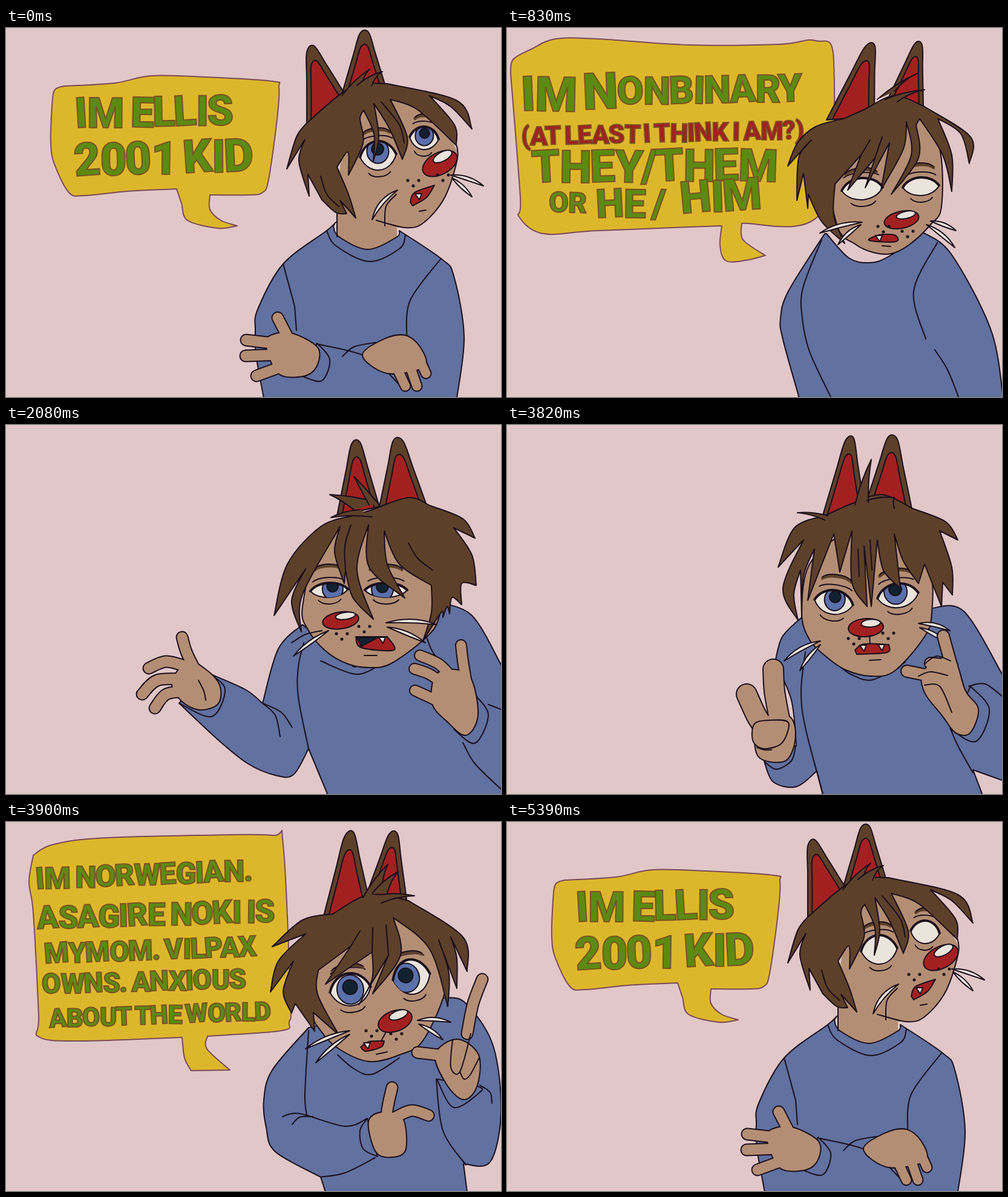
Recreate the animation shown at these times as an HTML page. Size 818 px wide and 610 px high, loop 5.47 s.

```html
<!DOCTYPE html>
<html lang="en">
<head>
<meta charset="utf-8">
<title>About me</title>
<style>
html, body { margin: 0; width: 100%; height: 100%; overflow: hidden; background: #e2c7c9; }
svg { display: block; width: 818px; height: 610px; }
path, ellipse { stroke: #1a0e1c; stroke-width: 2; stroke-linejoin: round; stroke-linecap: round; }
text { font: 900 50px Roboto, "Liberation Sans", sans-serif; letter-spacing: -.03em; word-spacing: -.05em; fill: #5c8a12; stroke: #7c5020; stroke-width: 2; }
text.red { fill: #a02022; }
</style>
</head>
<body>
<svg id="stage" viewBox="0 0 818 610"></svg>
<script>
const ink = '#1a0e1c', gold = '#ddb72b', blue = '#6171a0', skin = '#b48e74', brown = '#5d402a',
  red = '#a32021', white = '#ebe4dc', iris = '#5a70ab', dark = '#10222f';

// Smooth curve through points, with a sharp corner at each "/".
function curve(text, closed) {
  const loop = closed && !text.includes('/');
  let d = '', end;
  for (const piece of text.split('/')) {
    if (!piece.trim()) continue;
    const n = piece.trim().split(' ').map(Number), pts = end ? [end] : [];
    for (let i = 0; i < n.length; i += 2) pts.push([n[i], n[i + 1]]);
    if (!end) d = 'M' + pts[0];
    if (loop) pts.push(pts[0]);
    for (let i = 1; i < pts.length; i++) {
      const b = pts[i - 1], p = pts[i];
      const a = pts[i - 2] || (loop ? pts.at(-2) : b);
      const q = pts[i + 1] || (loop ? pts[1] : p);
      d += `C${b.map((v, k) => v + (p[k] - a[k]) / 6)} ${p.map((v, k) => v - (q[k] - b[k]) / 6)} ${p}`;
    }
    end = pts.at(-1);
  }
  return d + (closed ? 'Z' : '');
}

const path = (d, fill = 'none', edge = ink, width = 2) => `<path d="${d}" fill="${fill}" style="stroke:${edge};stroke-width:${width}"/>`;
const shape = (fill, text, edge) => path(curve(text, true), fill, edge);
const line = text => path(curve(text));
const oval = (x, y, rx, ry, fill) => `<ellipse cx="${x}" cy="${y}" rx="${rx}" ry="${ry}" fill="${fill}"/>`;
const at = (x, y, turn, inner) => `<g transform="translate(${x} ${y}) rotate(${turn})">${inner}</g>`;

const sweater = text => shape(blue, text);
const face = text => shape(skin, text);
const hair = text => shape(brown, text);
const balloon = text => shape(gold, text, '#7a4a58');

function say(x, y, size, turn, text, tone = '') {
  const tilt = [...text].map((_, i) => (i * 3 % 5 - 2) * 1.2).join(' ');
  return `<text class="${tone}" x="${x}" y="${y}" rotate="${tilt}" transform="rotate(${turn} ${x} ${y})" style="font-size:${size}px">${text}</text>`;
}

// Base corners a and b, tip t; the inside is the same outline, smaller.
function ear(ax, ay, bx, by, tx, ty) {
  const cx = (ax + bx) / 2, cy = (ay + by) / 2, wx = bx - ax, wy = by - ay;
  const side = (x, y, s) => [x + (tx - x) * .6 + wx * s, y + (ty - y) * .6 + wy * s];
  const pts = [[ax, ay], side(ax, ay, -.06), [tx - wx * .1, ty - wy * .1 + 2], [tx + wx * .1, ty + wy * .1 + 2], side(bx, by, .06), [bx, by]];
  const part = k => pts.map(([x, y]) => `${cx + (x - cx) * k} ${cy + (y - cy) * k}`).join(' ') + '/';
  return shape(brown, part(1)) + shape(red, part(.76));
}

let eyes = 0;
function eye(x, y, rx, ry, turn, dx, dy, r, gap) {
  const arc = (h, w = rx, lift = 0) => `M${-w} ${-lift}C${-w * .6} ${-h * 1.33 - lift} ${w * .6} ${-h * 1.33 - lift} ${w} ${-lift}`;
  const ball = arc(ry) + `C${rx * .6} ${ry * 1.33} ${-rx * .6} ${ry * 1.33} ${-rx} 0Z`;
  const id = 'eye' + eyes++;
  return at(x, y, turn, `<clipPath id="${id}"><path d="${ball}"/></clipPath>` + path(ball, white) +
    `<g clip-path="url(#${id})">${oval(dx, dy, r, r * 1.1, iris)}${oval(dx, dy - 4, r * .55, r * .55, dark)}</g>` +
    path(arc(ry), 'none', ink, 4) + path(arc(6, rx * .85, ry + 3)) + path(arc(-7, rx * .6, -ry - 4)) +
    path(arc(6, rx * .75, ry + gap - 4), 'none', brown, 5) + path(arc(7, rx * .75, ry + gap - 2)));
}

const nose = (x, y, rx, ry, turn) => at(x, y, turn, oval(0, 0, rx, ry, red) + oval(rx * .3, -ry * .45, rx * .55, ry * .42, white));
const fang = (x, y) => path(`M${x} ${y}l11 0l-4 10z`, white);
const freckles = (x, y) => [-9, 0, 9].map((d, i) => oval(x + d, y - 4 + i % 2 * 9, 1.5, 1.5, dark)).join('');

function whisker(x, y, tx, ty, bend) {
  const dx = tx - x, dy = ty - y, len = Math.hypot(dx, dy);
  const mid = b => `${(x + tx) / 2 + dy / len * b} ${(y + ty) / 2 - dx / len * b}`;
  return path(`M${x} ${y}Q${mid(bend + 6)} ${tx} ${ty}Q${mid(bend - 6)} ${x} ${y}Z`, white);
}

// Loose lock from a to the tip and back to b, open at the root.
const lock = (ax, ay, bx, by, tx, ty) =>
  path(`M${ax} ${ay}Q${(ax + tx) / 2 - 3} ${(ay + ty) / 2 - 5} ${tx} ${ty}Q${(bx + tx) / 2 - 3} ${(by + ty) / 2 - 5} ${bx} ${by}`, brown);

// Fingers are thick strokes merged with the palm.
function hand(width, palm, ...fingers) {
  const p = curve(palm, true);
  const layer = (edge, extra) => fingers.map(f => path(curve(f), 'none', edge, width + extra)).join('');
  return path(p, skin, ink, 4) + layer(ink, 4) + path(p, skin, 'none') + layer(skin, 0);
}

const poses = {
  proud: {
    speech: balloon('96 96 180 91 240 79 330 81 440 88 451 98 448 150 434 250 424 272 400 276 337 276/337 300 355 318 382 327/350 331 300 318 290 290 282 266/200 270 130 277 104 272 80 225 74 190 76 130 80 103 96 96') +
      say(115, 165, 70, -1, 'IM ELLIS') + say(114, 245, 76, -1.6, '2001 KID'),
    body: shape(skin, '547 270 547 345/570 362 605 370 646 350/646 320/', 'none') +
      sweater('545 321 530 335 458 390 416 465 412 500 413 540 426 612/745 612/757 510 740 410 720 382 650 335/645 346 598 366 550 345 541 327/') +
      line('547 300 547 345') + line('530 335 545 360 600 386 650 365 660 343') +
      line('458 390 477 460/480 500') + line('718 382 668 450 662 510') +
      line('517 523 600 545 655 595') + line('556 543 575 527 610 520') +
      sweater('514 521 535 548 522 583 490 576/'),
    head: shape(skin, '575 140 640 120 700 130 735 185 745 215 725 280 690 322 660 330 625 325 550 300', 'none') +
      line('742 185 746 215 725 280 690 322 660 330 612 318') +
      ear(497, 160, 558, 106, 503, 33) + ear(556, 106, 627, 96, 592, 6) +
      eye(615, 211, 30, 24, -5, 0, -7, 18, 17) + eye(691, 182, 24, 19, 5, 0, -4, 15, 16) +
      hair('497 157 480 180 464 233/494 184/484 220 501 278/499 242/522 284/545 305 563 307/552 285/578 314/566 275 547 230/565 205 566 243/590 190 585 150 591 136/608 175 607 220/616 180 608 125/633 165 655 217/663 180 635 118/680 135 744 194/741 160 700 112/735 130 770 167/745 120 630 92/570 98 497 157') +
      lock(555, 112, 588, 95, 601, 68) + lock(580, 95, 604, 96, 622, 72) +
      line('620 122 650 160 658 190') + line('520 245 530 275 550 295') +
      nose(717, 224, 31, 18, -28) + shape(red, '668 288 675 272 708 260/695 280 672 294/') + fang(676, 274) + line('683 303 694 301') +
      freckles(673, 256) + freckles(722, 247) +
      whisker(647, 268, 605, 317, -12) + line('645 275 628 295 626 327') +
      whisker(735, 243, 789, 261, 6) + whisker(737, 248, 770, 279, 2),
    hands: hand(17, '450 505 480 508 515 530 512 560 490 575 450 570 430 520', '449 479 465 510', '397 516 450 522', '396 542 450 540', '414 575 455 560') +
      hand(15, '590 541 625 515 660 509 685 530 690 560 630 570', '660 592 645 560', '679 592 668 560', '694 571 680 540')
  },
  shy: {
    speech: balloon('6 75 10 52 40 35 80 18 150 18 300 28 450 27 510 21 540 55 520 303 388 323/390 350 427 376/395 384 362 385 352 360 355 327/150 335 60 340 20 312 22 280 6 75') +
      say(24, 137, 80, 0, 'IM') + say(126, 135, 84, 0, 'N') + say(183, 127, 64, -1, 'ONBINARY') +
      say(24, 194, 43, -1.3, '(AT LEAST I THINK I AM?)', 'red') + say(42, 256, 75, -.6, 'THEY/THEM') +
      say(70, 305, 47, 0, 'OR') + say(148, 314, 66, -.6, 'HE /') + say(288, 307, 74, -3, 'HIM'),
    body: sweater('525 340 465 435 452 480 456 515 483 612/820 612/800 500 735 375 688 338/632 377 600 388 565 380 528 340') +
      line('520 350 489 430 488 480 500 535 536 612') + line('711 355 672 435 692 514') + line('707 532 728 565 747 612'),
    head: face('530 200 545 325 575 357 605 371 635 373 665 358 700 325 718 295 715 200 680 140 600 140') +
      ear(528, 152, 607, 145, 600, 28) + ear(628, 120, 688, 132, 680, 25) +
      eye(587, 266, 34, 18, -5, 8, 6, 17, 12) + eye(684, 262, 30, 15, -3, 0, 5, 16, 19) +
      hair('556 150 510 163 480 190 464 228/503 185/482 215 479 285/490 240/497 298/498 275/520 320 558 356/540 310 542 258/585 210/563 268/608 215/592 264/632 190/618 268/655 200 660 155/668 210 635 275/680 215 676 160/682 150/720 210 735 270/735 210 712 150/750 175 764 224/766 180 690 130/640 112 590 135 556 150') +
      lock(612, 118, 640, 105, 678, 75) + lock(625, 118, 645, 122, 690, 102) +
      line('585 210 600 185') + line('608 215 620 180') +
      nose(652, 317, 29, 14, -12) + shape(red, '598 351 615 342 640 342 646 351 633 354') + fang(609, 343) + line('620 360 634 361') +
      freckles(622, 332) + freckles(662, 340) +
      whisker(587, 321, 517, 339, -7) + whisker(585, 325, 547, 358, -5) + whisker(693, 325, 740, 363, 6) + whisker(700, 319, 742, 335, 4),
    hands: ''
  },
  shrug: {
    speech: balloon('29 70 60 55 150 47 260 38 420 40 460 46 467 60 468 200 440 290 362 299/362 320 399 348/370 356 340 354 328 330 328 296/150 311 55 318 44 300 30 160 29 70') +
      say(50, 142, 72, -.8, 'IM ARTIST?') + say(62, 200, 55, -1.5, 'I LIKE FIBDRAW') + say(65, 248, 49, -3, 'WATERCOLOR') + say(65, 295, 44, -2.4, 'AND IVSKETCHA4'),
    body: sweater('490 330 450 370 424 460/395 437 336 411/286 460/350 520 400 560 445 579 475 578 500 535/532 612/820 612/820 400/770 315 712 293/660 370 575 400/') +
      line('492 360 483 400 483 450 500 535') + line('424 460 445 480 453 515') + line('424 460 455 475 473 500') +
      line('690 335 705 375 735 410') + line('755 525 775 560 818 602') + line('520 390 580 412 625 392') +
      sweater('336 411 362 437 340 482 286 460/') + sweater('740 503 775 526 797 480 777 448/') + line('797 462 818 470'),
    head: face('495 200 465 300 475 340 505 375 540 395 575 401 610 395 665 355 690 320 695 250 670 180 580 150') +
      ear(522, 150, 592, 135, 553, 28) + ear(592, 135, 672, 138, 623, 24) +
      eye(509, 273, 31, 12, -3, 6, -2, 17, 26) + eye(603, 273, 35, 12, 0, -6, -2, 18, 26) +
      hair('548 150 495 168 440 230 418 315/470 238/447 290 463 342/465 280 527 168/518 210 534 262/536 240/548 285 582 321/555 240 574 165/575 235 634 286/605 230 600 175/625 230 678 265/678 310 664 357/694 310 697 318/704 300 708 312/712 285 728 297/728 262 752 265/745 215 715 170/750 187/730 155 675 133/640 120 580 140 548 150') +
      lock(590, 128, 550, 140, 510, 115) + lock(560, 140, 580, 152, 512, 153) + lock(575, 132, 592, 132, 550, 85) +
      line('545 165 535 200 536 240') + line('640 195 655 220 680 240') +
      nose(528, 323, 30, 14, -8) + shape(red, '553 350 605 350/616 372 562 368 553 350') + shape(dark, '555 352 590 351/562 366/') + fang(591, 351) + line('567 381 588 381') +
      freckles(567, 337) + freckles(530, 349) +
      whisker(603, 327, 687, 330, 9) + whisker(605, 334, 668, 360, 5) + whisker(508, 340, 450, 382, -4) + line('497 340 470 346 447 360'),
    hands: hand(17, '300 392 330 405 352 430 350 460 320 470 290 455 275 425', '291 351 298 375 310 400', '236 402 265 391 300 400', '225 445 250 422 295 420', '246 468 265 445 300 440') +
      line('318 422 327 440 330 455') +
      hand(16, '710 415 740 405 768 420 779 480 760 512 730 490 705 460', '752 364 755 390 760 420', '684 381 715 395 735 415', '675 403 700 412 725 430', '676 439 700 450 720 460')
  },
  turn: {
    body: sweater('487 318 455 350 443 392/470 455 478 530/425 556/440 590 478 598 512 572/522 612/786 612/770 570/820 588/820 415/755 308 700 303/') +
      line('493 375 486 440 493 500 522 610') + line('732 500 745 530 770 575') + line('545 395 570 413 605 421 658 392') +
      sweater('733 503 775 523 797 470 766 432/') + line('763 432 790 428 820 450') + line('425 556 445 569 470 555 477 530'),
    head: face('500 230 487 310 500 355 530 385 560 405 600 415 640 407 690 350 702 310 698 240 650 180 560 180') +
      ear(521, 152, 590, 132, 566, 22) + ear(592, 132, 670, 143, 637, 20) +
      eye(540, 293, 32, 20, 8, 1, -5, 17, 21) + eye(646, 282, 34, 20, -8, -3, -7, 19, 20) +
      hair('525 150 475 170 448 235/490 190/456 270 481 323/474 280 485 240/487 318/490 250 508 205/497 290/540 180/550 243/570 175/570 260 595 300/590 200/602 300/612 190/622 240 650 270/640 180/655 225 680 262/690 230/718 300/720 260/736 281/735 235 715 175/745 190/725 160 670 138/620 115 570 130 525 150') +
      lock(530, 150, 525, 157, 480, 145) + lock(575, 132, 597, 128, 602, 57) + lock(595, 125, 640, 138, 640, 120) +
      line('580 205 582 250') + line('600 190 603 240') +
      nose(593, 335, 29, 15, -4) + shape(red, '575 372 590 362 631 363/628 376 578 379/') + fang(583, 364) + fang(613, 363) + line('599 348 600 361') + line('599 389 618 388') +
      freckles(573, 357) + freckles(630, 348) +
      whisker(518, 357, 458, 390, -8) + whisker(518, 363, 484, 406, -4) + whisker(680, 328, 732, 340, 7) + whisker(682, 335, 727, 360, 4),
    hands: hand(32, '415 490 460 480 475 500 472 535 455 556 415 546', '396 445 412 480 425 500', '440 404 442 440 450 485') +
      face('405 515 410 493 435 488 465 492 455 525 430 535 412 530') + line('413 533 425 537 437 537') +
      hand(18, '690 405 735 385 757 440 778 470 765 508 742 508 720 480 690 440', '721 349 735 400', '661 407 700 415', '700 394 735 398') +
      line('690 395 710 382 733 390') + line('680 415 700 408 728 414') + line('690 430 715 432 735 475')
  },
  point: {
    speech: balloon('45 55 75 38 150 27 320 22 440 22 458 38 470 290 468 330 455 345 333 354/332 375 370 410/306 411/295 390 291 356/120 362 54 355 54 320 45 150 38 100 45 55') +
      say(50, 111, 50, -2.2, 'IM NORWEGIAN.') + say(52, 177, 53, -1.7, 'ASAGIRE NOKI IS') + say(64, 234, 47, -2, 'MYMOM. VILPAX') +
      say(60, 284, 46, -1.5, 'OWNS. ANXIOUS') + say(72, 340, 43, -2, 'ABOUT THE WORLD'),
    body: sweater('500 340 440 410 426 460 430 505 445 545 520 587/528 612/762 612/756 565/800 562 818 480 805 370 760 300 728 290/') +
      line('500 345 494 450 497 485') + line('711 425 722 510 760 567') + line('457 487 485 482 560 503 597 490') + line('473 500 485 488 507 487') +
      line('520 587 560 580 610 555') + line('548 385 575 408 605 417 650 390') +
      sweater('597 490 585 510 590 540 614 553/') + sweater('712 425 740 472 785 445 780 437/') + line('783 435 800 447 803 465'),
    head: face('500 200 505 310 520 345 550 375 600 396 650 385 690 360 728 270 720 200 670 155 580 150') +
      ear(523, 163, 600, 128, 567, 19) + ear(592, 130, 662, 128, 640, 18) +
      eye(569, 277, 34, 27, -8, 0, 0, 22, 11) + eye(670, 256, 31, 29, -10, -9, 0, 22, 9) +
      hair('540 152 490 162 440 206/495 185/450 230 437 281/475 230/458 280 472 316/478 300/510 346/508 315/550 352/515 285 516 245/570 205/528 268/605 215/605 260 583 302/632 220/606 284/652 220 640 158/700 210 730 305/732 250 715 195/745 275/745 225 735 190/762 247/755 190 665 130/600 120 540 152') +
      lock(590, 125, 620, 115, 631, 70) + lock(605, 118, 630, 118, 648, 82) + lock(620, 120, 620, 134, 675, 122) +
      line('605 215 606 175') + line('570 205 585 180') + line('632 220 628 170') +
      nose(643, 329, 29, 17, -20) + shape(red, '586 372 600 363 625 362/620 372 595 379 586 372') + fang(591, 365) + line('612 384 630 380') + line('627 349 620 362') +
      freckles(604, 349) + freckles(645, 354) +
      whisker(568, 345, 495, 375, -6) + whisker(568, 351, 512, 398, -5) + whisker(680, 328, 735, 331, 7) + whisker(682, 334, 722, 360, 4),
    hands: hand(17, '600 495 625 480 655 490 660 540 640 553 612 545', '638 439 632 465 628 490', '698 485 670 477 640 490') +
      hand(17, '710 385 745 360 780 385 778 435 757 458 730 435', '787 260 772 300 762 350', '680 381 715 385') +
      line('738 360 735 405 750 413 768 350') + line('750 413 757 425 767 418 782 390')
  }
};

// Start time, pose, speaking, head offset
const scenes = [
  [0, 'proud', true], [750, 'shy', false, 'translate(18 -18) rotate(-5 610 250)'],
  [830, 'shy', true], [2080, 'shrug', false, 'translate(25 0)'],
  [2160, 'shrug', true], [3820, 'turn', false],
  [3900, 'point', true], [5310, 'proud', false, 'translate(-18 22) rotate(5 610 230)'],
  [5390, 'proud', true]
];

const stage = document.getElementById('stage');
stage.innerHTML = scenes.map(([, name, speaks, shift = '']) => {
  const p = poses[name];
  return `<g visibility="hidden">${speaks ? p.speech : ''}${p.body}<g transform="${shift}">${p.head}</g>${p.hands}</g>`;
}).join('');

let shown = stage.children[0];
function tick() {
  const t = performance.now() % 5470;
  shown.setAttribute('visibility', 'hidden');
  shown = stage.children[scenes.findLastIndex(s => t >= s[0])];
  shown.setAttribute('visibility', 'visible');
  requestAnimationFrame(tick);
}
tick();
</script>
</body>
</html>
```
